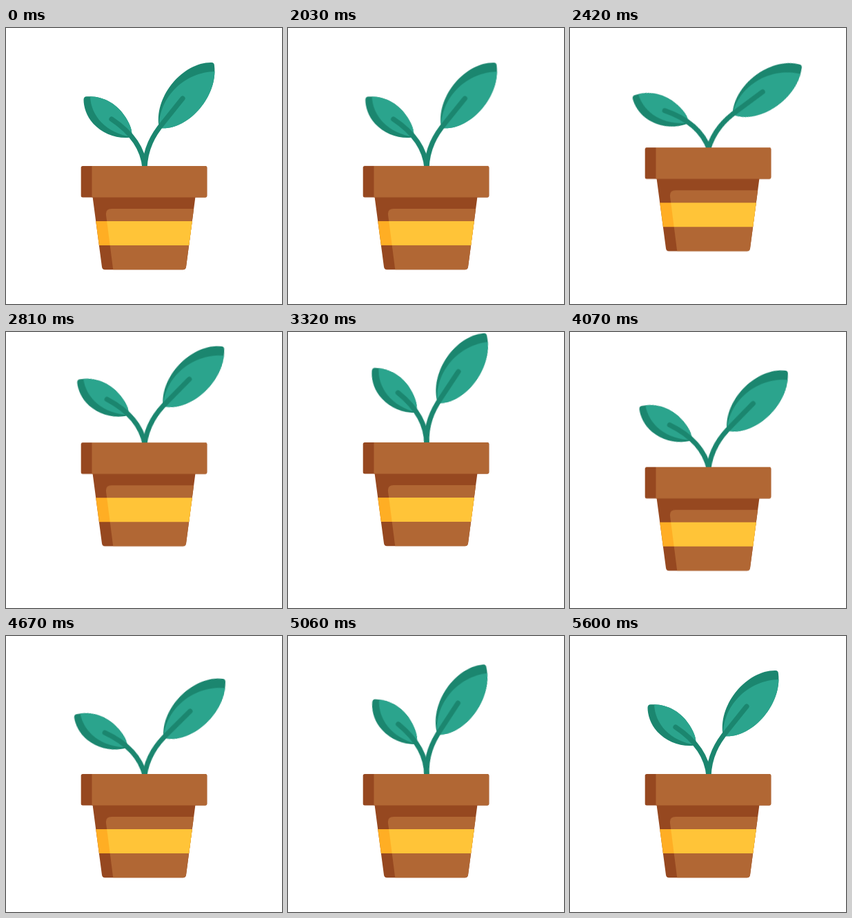
These frames come from a looping animation (400x400 px, 5630 ms). An HTML page:

```html
<!DOCTYPE html>
<html lang="en">
<head>
<meta charset="utf-8">
<title>Potted sprout</title>
<style>
  html, body { margin: 0; width: 100%; height: 100%; overflow: hidden; background: #fff; }
  svg { display: block; width: 100%; height: 100%; }
  .leaf { transform-origin: 201px 200px; }
  .stem { fill: none; stroke: #1b866f; stroke-width: 7.2; stroke-linecap: round; }
  .shade { fill: #1b866f; }
  .lit { fill: #2ba48d; }
  .clay { fill: #b16734; }
  .dark { fill: #964820; }
</style>
</head>
<body>
<svg viewBox="0 0 400 400">
  <defs>
    <path id="bigShape" d="M297 50Q302 49.500 302 55C307 99 265 147 226 145.300Q222 145 221.500 141C216 97 257 50 297 50Z"/>
    <path id="smallShape" d="M112.500 104Q112.500 99.500 117 99.300C140 97.500 162 110 173.800 130C181 141.500 182.500 149 182.500 155Q182.500 158.500 178.500 158.800C159.500 160.500 139.500 152.800 126.300 138.500C116.500 127.500 112.500 114 112.500 104Z"/>
    <path id="bodyShape" d="M125.300 243H274.700L261 346.300Q260.500 350.200 256.500 350.200H143.500Q139.500 350.200 139 346.300Z"/>
    <clipPath id="bigClip"><use href="#bigShape"/></clipPath>
    <clipPath id="smallClip"><use href="#smallShape"/></clipPath>
    <clipPath id="bodyClip"><use href="#bodyShape"/></clipPath>
  </defs>
  <g id="plant">
    <g id="left" class="leaf">
      <use href="#smallShape" class="shade"/>
      <path class="lit" clip-path="url(#smallClip)" d="M122 95C121 125 143 152 182 158L195 150V95Z"/>
      <path class="stem" d="M201 203C199 176 183 152 153 132"/>
    </g>
    <g id="right" class="leaf">
      <use href="#bigShape" class="shade"/>
      <path class="lit" clip-path="url(#bigClip)" d="M222 150V145C221 98 262 62 306 63V150Z"/>
      <path class="stem" d="M201 203C202 175 213 155 228 137L256 102"/>
    </g>
    <g clip-path="url(#bodyClip)">
      <path class="dark" d="M120 240H280V352H120Z"/>
      <path class="clay" d="M280 262H153Q144 262 145 271L155.500 352H280Z"/>
      <path fill="#ffae24" d="M120 280H280V315H120Z"/>
      <path fill="#ffc438" d="M146.200 280H280V315H150.700Z"/>
    </g>
    <rect class="dark" x="108.700" y="200" width="182.600" height="45.500" rx="2.500"/>
    <path class="clay" d="M124.500 200H288.800Q291.300 200 291.300 202.500V243Q291.300 245.500 288.800 245.500H124.500Z"/>
  </g>
</svg>
<script>
  const LOOP = 5630;
  const SWING = 'cubic-bezier(.37,0,.63,1)';
  const LIFT = 'cubic-bezier(.4,0,.3,1)';

  // steps: [time in ms, value]
  function play(id, steps, easing, toTransform) {
    const frames = [[0, 0], ...steps, [LOOP, 0]].map(([ms, v]) =>
      ({ offset: ms / LOOP, transform: toTransform(v), easing }));
    document.getElementById(id).animate(frames, { duration: LOOP, iterations: Infinity });
  }

  // Leaves open outward by the given angle; side mirrors the direction.
  function swing(id, side, landing) {
    play(id, [
      [2000, 0], [2400, 14.8], [3280, -5.2], [3610, -5.2],
      [4410, landing], [5090, -5.6], [5600, 0]
    ], SWING, v => `rotate(${side * v}deg)`);
  }

  play('plant', [[2000, 0], [2890, -40], [3430, -40], [4400, 0]], LIFT,
    v => `translate(0px, ${v}px)`);
  swing('left', -1, 15.5);
  swing('right', 1, 12.3);
</script>
</body>
</html>
```
